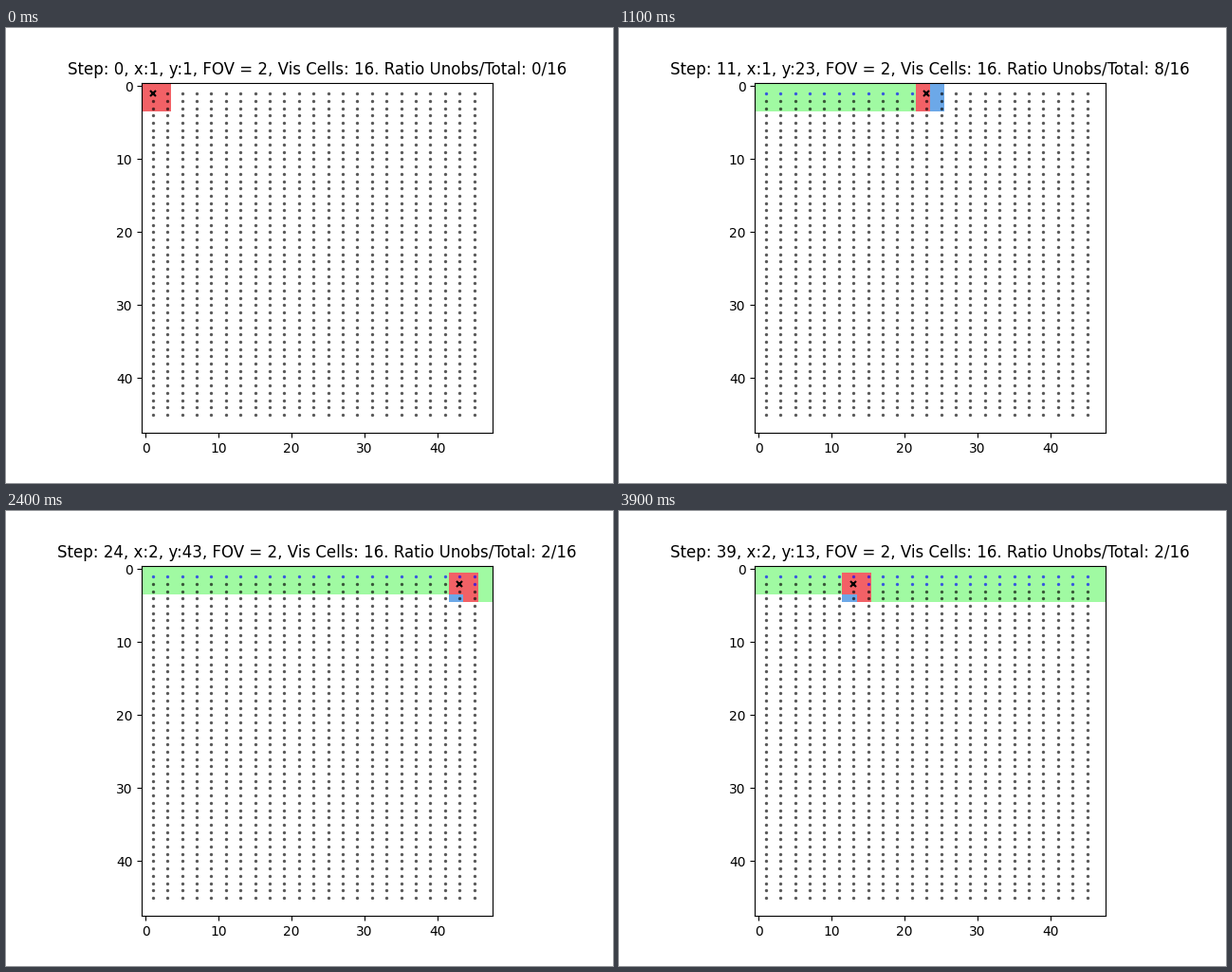
A matplotlib script for the animation above (4000 ms loop, 640 by 480 pixels).

```python
import numpy as np
import matplotlib.pyplot as plt
from matplotlib.animation import FuncAnimation

SIZE = 48      # cells per side
FOV = 2
STEPS = 40
WHITE = (255, 255, 255)
GREEN = (160, 250, 162)
RED = (242, 97, 102)
BLUE = (108, 168, 232)

columns = np.arange(1, 46, 2)
rows = np.arange(1, 46)


def make_path():
    """Sweep the grid row by row, turning back at each end."""
    path = []
    for i, row in enumerate(rows):
        sweep = columns if i % 2 == 0 else columns[::-1]
        path += [(int(row), int(col)) for col in sweep]
    return path


path = make_path()


def window(step):
    row, col = path[step]
    return slice(row - FOV + 1, row + FOV + 1), slice(col - FOV + 1, col + FOV + 1)


def observed_before(step):
    seen = np.zeros((SIZE, SIZE), bool)
    seen[window(0)] = True
    for k in range(step):
        seen[window(k)] = True
    return seen


def paint(seen, view):
    cells = np.empty((SIZE, SIZE, 3), np.uint8)
    cells[:] = WHITE
    cells[seen] = GREEN
    cells[view] = np.where(seen[view][..., None], RED, BLUE)
    return cells


fig, ax = plt.subplots(figsize=(6.4, 4.8), dpi=100)
image = ax.imshow(np.full((SIZE, SIZE, 3), 255, np.uint8), interpolation="nearest")
dot_style = dict(ls="", marker="o", ms=2.4, mew=0)
todo, = ax.plot([], [], color="black", alpha=0.65, **dot_style)
done, = ax.plot([], [], color="blue", alpha=0.65, **dot_style)
agent, = ax.plot([], [], ls="", marker="x", color="black", ms=4.5, mew=1.5)
ax.set_xlim(-0.5, SIZE - 0.5)
ax.set_ylim(SIZE - 0.5, -0.5)


def place(line, points):
    line.set_data([c for r, c in points], [r for r, c in points])


def update(step):
    seen = observed_before(step)
    view = window(step)
    total = seen[view].size
    unseen = total - int(seen[view].sum())
    image.set_data(paint(seen, view))
    place(done, path[:step])
    place(todo, path[step:])
    place(agent, [path[step]])
    row, col = path[step]
    ax.set_title(f"Step: {step}, x:{row}, y:{col}, FOV = {FOV}, "
                 f"Vis Cells: {total}. Ratio Unobs/Total: {unseen}/{total}")
    return image, todo, done, agent


anim = FuncAnimation(fig, update, frames=STEPS, interval=100,
                     init_func=lambda: update(0), repeat=True, repeat_delay=0)
plt.show()
```
